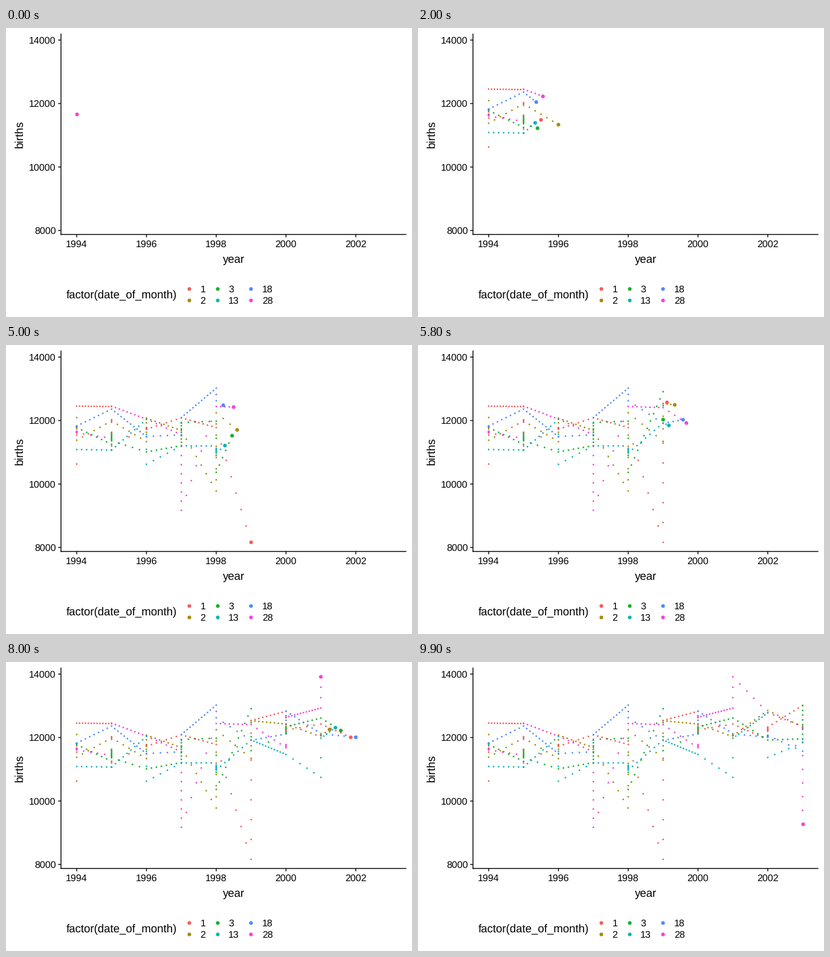
These frames come from a looping animation (672 px wide and 480 px high, 10000 ms). A matplotlib script:

```python
import numpy as np
import matplotlib
import matplotlib.pyplot as plt
from matplotlib.animation import FuncAnimation

matplotlib.rcParams["font.family"] = "Liberation Sans"
matplotlib.rcParams["text.hinting"] = "none"

W, H, DPI = 672, 480, 100
FRAMES, INTERVAL = 100, 100
HEAD_R, TRAIL_R = 3.1, 1.37

# Births on every Friday that falls on the given day of the month, 1994-2003
BIRTHS = {
    1: [10630, 12455, 12440, 11200, 11770, 11727, 12085, 11780, 8163, 12540,
        12825, 12235, 12425, 11937, 12197, 12330, 13013],
    2: [12095, 11382, 11990, 11335, 12075, 11685, 9780, 12245, 11345, 12530,
        12425, 12027, 12083, 12055, 12852, 12340],
    3: [11780, 11250, 11630, 11363, 11012, 11210, 11940, 11980, 10367, 12910,
        11587, 12130, 12340, 12615, 11922, 11960, 13004],
    13: [11088, 11070, 11070, 12036, 10623, 11202, 11202, 11125, 10975, 11922,
         11467, 10746, 11980, 12776, 11372, 11837],
    18: [11790, 11800, 11827, 12360, 11495, 11552, 12093, 13022, 12624, 11912,
         12112, 12833, 12121, 12008, 12065, 11571, 12311],
    28: [11666, 11610, 11438, 12453, 12045, 11552, 11186, 9172, 12444, 12406,
         11681, 11780, 12643, 12928, 13914, 12785, 12349, 12292, 9276],
}
COLORS = ["#F35E5A", "#A58C0B", "#18B12A", "#13B2B7", "#4F8AFF", "#F343DC"]

LEFT, RIGHT, TOP, BOTTOM = 91, 662.67, 9.33, 342.9


def x_px(year):
    return 117 + (year - 1994) * 57.74


def y_px(births):
    return 20.05 + (14000 - births) / 18.97


def fridays(day):
    days = np.arange("1994-01-01", "2004-01-01", dtype="datetime64[D]")
    weekday = (days.astype(int) + 3) % 7
    month_day = (days - days.astype("datetime64[M]")).astype(int) + 1
    return days[(weekday == 4) & (month_day == day)]


def build_points():
    """Position of every group at every frame, in drawing order."""
    dates = {d: fridays(d) for d in BIRTHS}
    start = min(v[0] for v in dates.values())
    span = (max(v[-1] for v in dates.values()) - start).astype(int)
    rows = []
    for g, (day, births) in enumerate(BIRTHS.items()):
        when = dates[day]
        keys = np.round((when - start).astype(int) / span * (FRAMES - 1))
        years = when.astype("datetime64[Y]").astype(int) + 1970
        t = np.arange(keys[0], keys[-1] + 1)
        x = x_px(np.interp(t, keys, years))
        y = y_px(np.interp(t, keys, births))
        rows += list(zip(t, np.full(len(t), g), x, y))
    return np.array(sorted(rows))


fig = plt.figure(figsize=(W / DPI, H / DPI), dpi=DPI, facecolor="white")
ax = fig.add_axes([0, 0, 1, 1])
ax.set_xlim(0, W)
ax.set_ylim(H, 0)
ax.axis("off")


def px(n):
    return n * 72 / DPI


def line(xs, ys):
    ax.plot(xs, ys, color="black", lw=px(1.42), snap=False,
            solid_capstyle="butt")


def text(x, y, s, size=16, ha="left", **kw):
    ax.text(x, y, s, fontsize=px(size), ha=ha, va="baseline",
            color="black", **kw)


def dots(x, y, r, c, z):
    return ax.scatter(x, y, s=px(2 * r) ** 2, c=c, linewidths=0, zorder=z)


# Axes
line([LEFT, LEFT], [TOP, BOTTOM + 0.7])
line([LEFT - 0.7, RIGHT], [BOTTOM, BOTTOM])
for births in range(8000, 14001, 2000):
    y = y_px(births)
    line([LEFT - 4.67, LEFT], [y, y])
    text(82.6, y + 5.8, str(births), ha="right")
for year in range(1994, 2003, 2):
    x = x_px(year)
    line([x, x], [BOTTOM, BOTTOM + 4.67])
    text(x, 364, str(year), ha="center")
text(376.8, 390, "year", 18.67, "center")
text(28, 176, "births", 18.67, "center", rotation=90, rotation_mode="anchor")

# Legend
text(99.7, 449, "factor(date_of_month)", 18.67)
for i, day in enumerate(BIRTHS):
    x = (303, 349.5, 405.3)[i // 2]
    y = (432.7, 452)[i % 2]
    dots([x], [y], HEAD_R, COLORS[i], 2)
    text(x + 18.6, y + 6, str(day))

points = build_points()
when, xy = points[:, 0], points[:, 2:]
palette = np.array([matplotlib.colors.to_rgba(COLORS[int(g)])
                    for g in points[:, 1]])
trail = dots([], [], TRAIL_R, None, 3)
heads = dots([], [], HEAD_R, None, 4)


def show(artist, mask):
    artist.set_offsets(xy[mask])
    artist.set_facecolors(palette[mask])


def update(n):
    show(trail, when < n)
    show(heads, when == n)
    return trail, heads


anim = FuncAnimation(fig, update, frames=FRAMES, interval=INTERVAL,
                     init_func=lambda: update(0), repeat=True,
                     repeat_delay=0, blit=False)
plt.show()
```
